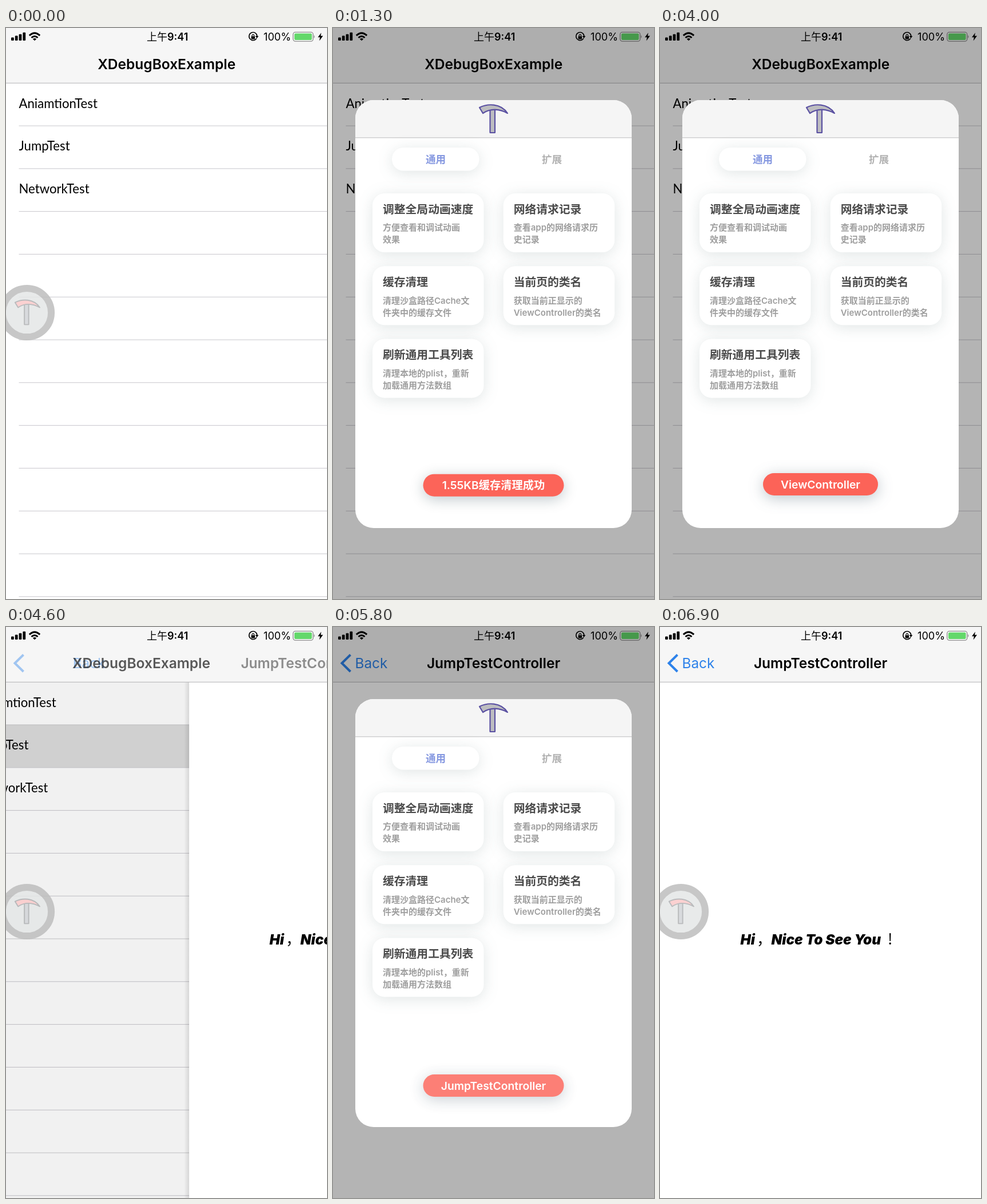
These frames come from a looping animation (561x998 px, 7 s). An HTML page:

```html
<!DOCTYPE html>
<html lang="zh-CN">
<head>
<meta charset="utf-8">
<title>Debug box demo</title>
<style>
html, body { margin: 0; width: 100%; height: 100%; overflow: hidden; background: #fff; }
svg { display: block; width: 100%; height: 100%; }
text { font-family: Inter, "Noto Sans CJK SC", "Noto Sans CJK", sans-serif; white-space: pre; }
.row { font: 22.2px Lato, "Open Sans", sans-serif; }
.nav { font-size: 24.5px; font-weight: 600; }
.hi { font: italic 900 24.3px Inter, "Open Sans", sans-serif; }
.cjk { font: 26px "Noto Sans CJK SC", "Noto Sans CJK", sans-serif; }
.head { font-size: 19.8px; font-weight: 700; fill: #4a4a4a; }
.desc { font-size: 15px; font-weight: 600; fill: #9e9e9e; }
.tab { font-size: 17.6px; font-weight: 700; }
.toast { font-size: 19.3px; font-weight: 600; fill: #fff; text-anchor: middle; }
.soft { filter: drop-shadow(0 4px 13px rgba(50, 80, 80, .15)); }
.deep { filter: drop-shadow(0 5px 13px rgba(40, 65, 85, .3)); }
</style>
</head>
<body>
<svg id="stage" viewBox="0 0 561 998" preserveAspectRatio="none"></svg>
<script>
const LOOP = 7000, STEP = 100, W = 561, ROW = 74.8, TOP = 96;
const stage = document.getElementById('stage');

const text = (cls, x, y, s, more = '') => `<text class="${cls}" x="${x}" y="${y}" ${more}>${s}</text>`;
const rect = (x, y, w, h, fill, r = 0, more = '') =>
  `<rect x="${x}" y="${y}" width="${w}" height="${h}" rx="${r}" fill="${fill}" ${more}/>`;
const group = (id, body, more = '') => `<g id="${id}" ${more}>${body}</g>`;

const hammer = (x, y, k, line, head, grip) =>
  `<g transform="translate(${x} ${y}) scale(${k})" stroke="${line}" stroke-width="2.2" stroke-linejoin="round">
    ${rect(19.5, 10, 8.5, 41, grip, 0.5)}
    <path d="M1 7C15 0 38 -1 50 17C36 9 20 8 7 17Z" fill="${head}"/></g>`;

const lines = Array.from({ length: 12 }, (_, i) =>
  rect(22.5, TOP + ROW * (i + 1) - 0.3, 650, 1, '#c8c7cc')).join('');
const labels = ['AniamtionTest', 'JumpTest', 'NetworkTest'].map((s, i) =>
  text('row', 22.5, 139.5 + ROW * i, s)).join('');

const listPage = group('list',
  rect(0, TOP, 700, 902, '#fff') + rect(0, TOP + ROW, 700, ROW, '#dcdcdc', 0, 'id="press"') +
  lines + labels) + rect(0, TOP, W, 902, '#000', 0, 'id="shade"');

const jumpPage = group('jump',
  rect(-9, TOP, 9, 902, 'url(#edge)') + rect(0, TOP, W, 902, '#fff') +
  text('hi', 140.5, 555, 'Hi') + text('cjk', 169, 555, '，') +
  text('hi', 194.5, 555, 'Nice To See You') + text('cjk', 398, 555, '!'));

const navBar = rect(0, 0, W, TOP, '#f6f6f6') + rect(0, TOP - 0.2, W, 1, '#b4b4b6') +
  '<path id="chevron" d="M30.5 48.5L15.5 63.2L30.5 78" fill="none" stroke="#2d82ea" stroke-width="4"/>' +
  text('', 38.5, 72, 'Back', 'id="back" font-size="24.3" fill="#2d82ea"') +
  text('nav', 280.7, 72, 'XDebugBoxExample', 'id="title1" text-anchor="middle"') +
  text('nav', 280.5, 72, 'JumpTestController', 'id="title2" text-anchor="middle"');

const bars = [0, 1, 2, 3].map(i => rect(9 + 6.8 * i, 16.5 - 2.9 * i, 4.8, 5.5 + 2.9 * i, '#000', 1.2)).join('');
const arcs = `<g fill="none" stroke="#000" stroke-width="3">
  <path d="M40.8 13.2Q50 4.6 59.2 13.2"/><path d="M44.5 17Q50 12 55.5 17"/></g>
  <path d="M50 22.3L46.8 19.2Q50 16.6 53.2 19.2Z"/>`;
const lock = `<path d="M437.8 18.2A7 7 0 1 1 438.8 14.2" fill="none" stroke="#000" stroke-width="1.6"/>
  <path d="M435.6 14H441.4L438.5 18Z"/>${rect(428.6, 14.6, 6.4, 4.8, '#000', 0.6)}
  <path d="M430 15V13.2A1.8 1.8 0 0 1 433.6 13.2V15" fill="none" stroke="#000" stroke-width="1.2"/>`;
const battery = rect(501.8, 7.2, 35, 16, 'none', 4, 'stroke="#777" stroke-width="1.1"') +
  rect(504, 9.4, 30.6, 11.6, '#63d86a', 2) +
  '<path d="M538.3 12.5Q540.6 15.2 538.3 18Z" fill="#777"/><path d="M551 8.2L545 16.3H548.8L547.6 22.5L554 13.8H550Z"/>';
const status = bars + arcs + lock + battery +
  text('', 246, 21.8, '上午', 'font-size="18" font-weight="500"') +
  text('', 282, 21.8, '9:41', 'font-size="18" font-weight="600"') +
  text('', 450, 21.8, '100%', 'font-size="18.2"');

const button = group('button',
  '<circle cx="36.5" cy="497.5" r="42.6" fill="#e5e7e7" stroke="#bebebe" stroke-width="12"/>' +
  hammer(15, 473.5, 0.88, '#aeb0b2', '#fbcaca', '#d2d4d8'));

const cards = [
  ['调整全局动画速度', '方便查看和调试动画', '效果'],
  ['网络请求记录', '查看app的网络请求历', '史记录'],
  ['缓存清理', '清理沙盒路径Cache文', '件夹中的缓存文件'],
  ['当前页的类名', '获取当前正显示的', 'ViewController的类名'],
  ['刷新通用工具列表', '清理本地的plist，重新', '加载通用方法数组']
].map(([head, a, b], i) => {
  const x = i % 2 ? 297.7 : 69, y = 289 + 127.2 * Math.floor(i / 2);
  return rect(x, y, 194.5, 103, '#fff', 21, 'class="soft"') + text('head', x + 18, y + 34.5, head) +
    text('desc', x + 18, y + 65.3, a) + text('desc', x + 18, y + 86.3, b);
}).join('');

const toast = group('toast', rect(0, 0, 0, 39, '#fc6358', 19.5, 'id="pill" class="deep"') +
  text('toast', 280.5, 26.6, '', 'id="note"'));

const panel = group('panel',
  rect(39, 126, 483, 748, '#fff', 32) +
  `<path d="M39 192V158A32 32 0 0 1 71 126H490A32 32 0 0 1 522 158V192Z" fill="#f5f5f5"/>` +
  rect(39, 191.3, 483, 1, '#bcbcbe') + hammer(255, 132, 1, '#5b51a2', '#bdbdc0', '#bdbdc0') +
  rect(103, 209, 152.5, 40.5, '#fff', 20, 'class="soft"') +
  text('tab', 162, 236, '通用', 'fill="#8497e0"') + text('tab', 365, 236, '扩展', 'fill="#b2b2b2"') +
  cards + toast);

stage.innerHTML = `<defs><linearGradient id="edge"><stop stop-opacity="0"/><stop offset="1" stop-opacity=".11"/>
  </linearGradient></defs>` + listPage + jumpPage + navBar + status + button +
  rect(0, 0, W, 998, '#000', 0, 'id="dim"') + panel;

const el = {};
stage.querySelectorAll('[id]').forEach(n => el[n.id] = n);
const set = (id, attrs) => { for (const k in attrs) el[id].setAttribute(k, attrs[k]); };
const shift = (id, x, y = 0) => set(id, { transform: `translate(${x} ${y})` });
const show = (id, a) => { el[id].style.opacity = a; el[id].style.display = a > 0 ? '' : 'none'; };

const ramp = (t, from, len) => {
  const x = Math.min(1, Math.max(0, (t - from) / len));
  return 1 - (1 - x) ** 3;
};
const spring = ms => {
  const x = Math.max(0, ms) * 0.0172;
  const p = 1 - (1 + x) * Math.exp(-x);
  return p > 0.998 ? 1 : p;
};

// opened, closed, closing time
const opens = [[220, 4200, 0], [5120, 6420, 420]];
// shown, hidden, width, message
const toasts = [
  [1140, 1850, 246, '1.55KB缓存清理成功'],
  [3340, 4200, 201, 'ViewController'],
  [5690, 7000, 246, 'JumpTestController']
];

function openness(t) {
  const o = opens.find(([a, b, len]) => t >= a && t < b + len);
  if (!o) return 0;
  return t < o[1] ? ramp(t, o[0], 420) : 1 - ramp(t, o[1], o[2]);
}

function drawToast(t) {
  const m = toasts.find(([a, b]) => t >= a && t < b + 500);
  const a = m ? ramp(t, m[0], 300) - ramp(t, m[1], 500) : 0;
  show('toast', Math.min(1, 1.1 * a));
  if (!m) return;
  shift('toast', 0, 778 + 16 * (1 - a));
  set('pill', { x: 280.5 - m[2] / 2, width: m[2] });
  if (el.note.textContent !== m[3]) el.note.textContent = m[3];
}

function draw(t) {
  const p = spring(t - 4515), q = 1 - p;
  shift('list', -0.3 * W * p);
  show('press', t >= 4400 ? 1 : 0);
  show('shade', 0.13 * p);
  shift('jump', W * q);
  show('jump', p > 0 ? 1 : 0);
  shift('title1', -103 * p);
  show('title1', q ** 0.8);
  shift('title2', 432 * q);
  show('title2', p);
  show('chevron', p);
  shift('back', 137 * q);
  show('back', p);

  const o = openness(t), k = 0.9 + 0.1 * o;
  show('dim', 0.295 * o);
  show('panel', o);
  set('panel', { transform: `translate(280.5 500) scale(${k}) translate(-280.5 -500)` });
  show('button', 0.85 * (1 - o));
  drawToast(t);
}

const start = performance.now();
function tick() {
  const t = (performance.now() - start) % LOOP;
  draw(Math.floor(t / STEP) * STEP);
  requestAnimationFrame(tick);
}
draw(0);
requestAnimationFrame(tick);
</script>
</body>
</html>
```
